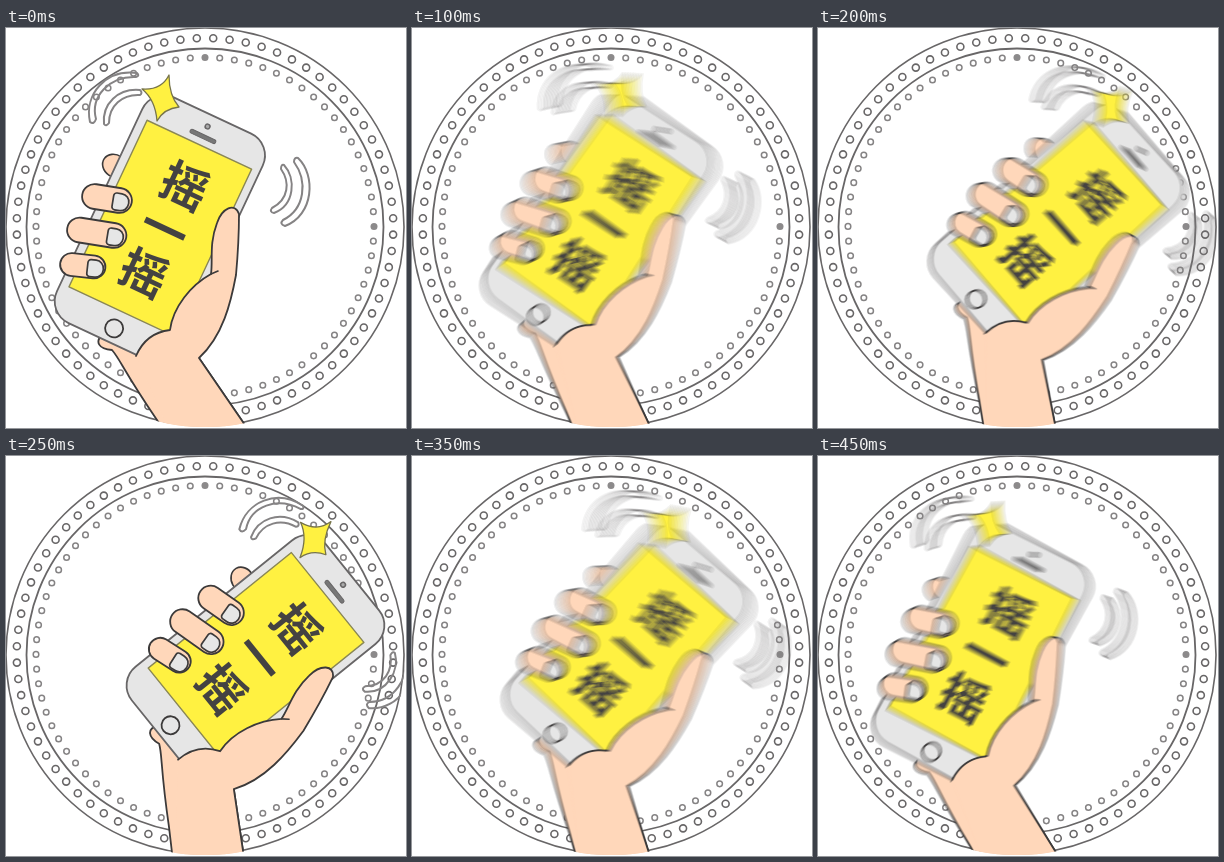
These frames come from a looping animation (400x400 px, 0.5 s). An HTML page with a canvas:

```html
<!DOCTYPE html>
<html lang="zh">
<head>
<meta charset="utf-8">
<style>
html, body { margin: 0; width: 100%; height: 100%; overflow: hidden; background: #fff; }
canvas { display: block; width: 400px; height: 400px; }
</style>
</head>
<body>
<canvas id="stage" width="400" height="400"></canvas>
<script>
const SIZE = 400, STEP = 50, STEPS = 10;
const SWING = 26, SHUTTER = 0.22, SAMPLES = 14;
const CENTER = 199;
const PIVOT = [203.7, 407];
const TILT = 25.1 * Math.PI / 180;
const INK = '#3c3a3a', GREY = '#686667', SKIN = '#ffd7ba', YELLOW = '#fff141', METAL = '#e6e6e6';

const stage = document.getElementById('stage').getContext('2d');
const layer = document.createElement('canvas');
layer.width = layer.height = SIZE;
const g = layer.getContext('2d');

function paint(path, fill, stroke, width) {
  if (fill) { g.fillStyle = fill; g.fill(path); }
  if (stroke) { g.strokeStyle = stroke; g.lineWidth = width; g.stroke(path); }
}

function ring(x, y, r, color, width, fill) {
  const p = new Path2D();
  p.arc(x, y, r, 0, 2 * Math.PI);
  paint(p, fill, color, width);
}

function box(x, y, w, h, r, fill, stroke, width) {
  const p = new Path2D();
  p.roundRect(x, y, w, h, r);
  paint(p, fill, stroke, width);
}

function dots(count, radius, shift, draw) {
  for (let i = 0; i < count; i++) {
    const a = (i + shift) * 2 * Math.PI / count;
    draw(CENTER + radius * Math.sin(a), CENTER - 0.6 - radius * Math.cos(a), i);
  }
}

function drawBadge() {
  ring(CENTER, CENTER, 199, GREY, 1.6);
  ring(CENTER, CENTER, 178.5, GREY, 1.8);
  dots(72, 188.3, 0.5, (x, y) => ring(x, y, 3.5, GREY, 1.6));
  dots(72, 169, 0, (x, y, i) => {
    if (i === 0 || i === 18) ring(x, y, 3.5, null, 0, '#8c8a8b');
    else ring(x, y, 2.8, '#858384', 1.5);
  });
}

const backHand = new Path2D('M97 306C88 314 93 321 106 322C114 331 117 342 151 392L169 420L252 416L193 330L150 300Z');
const palmEdge = 'M130 328C136 314 147 304 164 302C167 279 185 257 205 246C207 232 203 216 211 195C216 180 229 174 233 186C233 205 232 225 230 247C225 274 217 308 193 330L252 416';
const palm = new Path2D(palmEdge + 'L171 420L130 328Z');
const palmLine = new Path2D(palmEdge);
const crease = new Path2D('M205 246L212 243');
const star = new Path2D('M163 47C163 58 165 70 173 79C163 80 156 84 151 93C150 80 146 69 136 61C149 62 158 57 163 47Z');
const waves = [
  'M84 94C78 66 100 41 131 45Q134 48 130 49C104 48 84 68 90 91Q88 97 84 94Z',
  'M98 96C96 76 112 60 134 62Q137 65 134 67C116 66 103 78 103 95Q100 99 98 96Z',
  'M292 130C310 147 308 187 279 198Q273 196 277 192C299 181 302 153 288 134Q288 129 292 130Z',
  'M278 137C290 150 289 177 268 185Q263 184 266 180C283 171 284 154 275 141Q275 136 278 137Z'
].map(d => new Path2D(d));

function drawPhone() {
  g.save();
  g.translate(154.5, 199);
  g.rotate(TILT);
  box(-66.5, -123, 133, 249, 24, METAL, GREY, 1.8);
  box(-57.5, -91, 115.5, 184, 0, YELLOW, '#8a8755', 1.4);
  ring(1, 111.5, 9, INK, 1.8);
  ring(0, -111, 2.4, GREY, 1.5, '#aaa');
  box(-14, -102, 28, 4, 2, '#777', GREY, 1);
  g.fillStyle = '#444242';
  g.font = '900 47px "Noto Sans CJK SC", "Noto Sans CJK", sans-serif';
  g.textAlign = 'center';
  g.textBaseline = 'alphabetic';
  [...'摇一摇'].forEach((c, i) => g.fillText(c, 4.5, 18 + (i - 1) * 48));
  g.restore();
}

function capsule(x0, y0, x1, y1, width, color) {
  g.strokeStyle = color;
  g.lineWidth = width;
  g.beginPath();
  g.moveTo(x0, y0);
  g.lineTo(x1, y1);
  g.stroke();
}

function drawFinger(x0, y0, x1, y1, r) {
  capsule(x0, y0, x1, y1, 2 * r + 1.8, INK);
  capsule(x0, y0, x1, y1, 2 * r - 1.8, SKIN);
  g.save();
  g.translate(x1, y1);
  g.rotate(Math.atan2(y1 - y0, x1 - x0));
  box(-6.5, -7, 16, 17, [3, 8, 8, 3], METAL, INK, 1.7);
  g.restore();
}

function drawHand() {
  g.lineCap = g.lineJoin = 'round';
  for (const wave of waves) paint(wave, null, '#858384', 2);
  const index = new Path2D();
  index.ellipse(109, 138, 13, 11, 0.6, 0, 2 * Math.PI);
  paint(index, SKIN, INK, 1.6);
  paint(backHand, SKIN, INK, 1.8);
  drawPhone();
  paint(star, YELLOW, '#77744a', 1.3);
  drawFinger(88.5, 168.5, 113.5, 172.5, 12.4);
  drawFinger(73.5, 202, 108, 207.5, 12.4);
  drawFinger(65.5, 236.5, 88, 239, 11.4);
  paint(palm, SKIN);
  paint(palmLine, null, INK, 1.8);
  paint(crease, null, INK, 1.6);
}

function drawScene(degrees) {
  g.fillStyle = '#fff';
  g.fillRect(0, 0, SIZE, SIZE);
  drawBadge();
  g.save();
  g.beginPath();
  g.arc(CENTER, CENTER, 200, 0, 2 * Math.PI);
  g.clip();
  g.translate(...PIVOT);
  g.rotate(degrees * Math.PI / 180);
  g.translate(-PIVOT[0], -PIVOT[1]);
  drawHand();
  g.restore();
}

// Averages several poses around the current one to blur it by its speed.
function render(step) {
  const half = STEPS / 2;
  const s = 1 - Math.abs(step - half) / half;
  const angle = SWING * s * s * (3 - 2 * s);
  const spread = SWING * 6 * s * (1 - s) / half * SHUTTER;
  const count = spread > 0.01 ? SAMPLES : 1;
  for (let i = 0; i < count; i++) {
    const offset = count > 1 ? 2 * i / (count - 1) - 1 : 0;
    drawScene(angle + spread * offset);
    stage.globalAlpha = 1 / (i + 1);
    stage.drawImage(layer, 0, 0);
  }
}

let shown = -1;
const start = performance.now();
function tick() {
  const step = Math.floor((performance.now() - start) / STEP) % STEPS;
  if (step !== shown) render(shown = step);
  requestAnimationFrame(tick);
}
tick();
</script>
</body>
</html>
```
